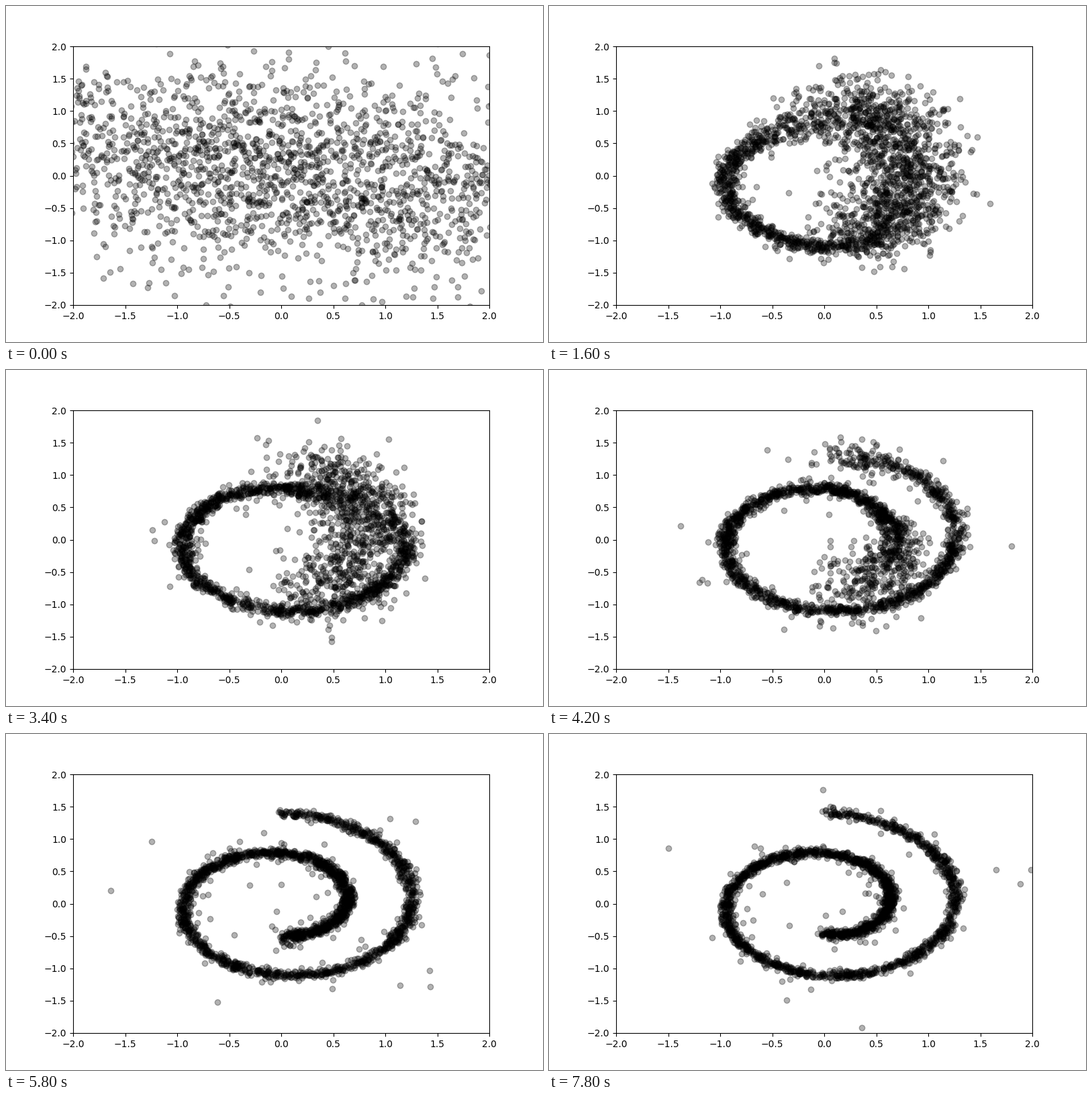
These frames come from a looping animation (800 px wide and 500 px high, 8 s). A matplotlib script:

```python
import numpy as np
import matplotlib.pyplot as plt
from matplotlib.animation import FuncAnimation

PI = np.pi
COUNT = 2200
FRAMES = 40
INTERVAL = 200
CLOUD_END, SHAPE_END = 8, 33     # frames where the cloud and the blur are gone
ANCHOR = 3.2 * PI                # spiral angle that is learned first


def looseness(t, u):
    """1 where the spiral is still blurred, 0 behind the sharp front."""
    front = PI * (0.3 + 1.4 * u * u * (3 - 2 * u))
    return np.clip((np.abs(t - ANCHOR) - front) / (0.6 * PI), 0, 1)


def spiral(rng, frame):
    u = np.clip((frame - CLOUD_END) / (SHAPE_END - CLOUD_END), 0, 1)
    t = rng.uniform(1.5 * PI, 4.5 * PI, COUNT)
    loose = looseness(t, u)

    # Loose coils merge halfway and lean towards the right-hand side.
    side = np.clip((3 * PI - t) / (PI / 2), -1, 1)
    radius = (t + PI * side * loose) / 10
    x, y = radius * np.cos(t), radius * np.sin(t)
    x += 0.45 * loose * (0.55 - x)

    spread = 0.033 + 0.025 * (1 - u) + 0.23 * loose
    spread += 0.1 * (rng.random(COUNT) < 0.04)
    return (x + spread * rng.standard_normal(COUNT),
            y + spread * rng.standard_normal(COUNT))


def samples(frame):
    rng = np.random.default_rng(100 + frame)
    x, y = spiral(rng, frame)

    # Stray points appear once the shape gets sharp.
    stray = rng.random(COUNT) < np.interp(frame, [12, 20], [0, 0.011])
    x = np.where(stray, rng.normal(0.2, 0.8, COUNT), x)
    y = np.where(stray, rng.normal(-0.2, 0.85, COUNT), y)

    # The untrained cloud quickly gives way to the shape.
    cloud_x = rng.normal(0, 1.65, COUNT)
    cloud_y = 0.08 - 0.17 * cloud_x + rng.normal(0, 0.8, COUNT)
    cloud = max(0, 1 - frame / CLOUD_END) ** 3
    return x + cloud * (cloud_x - x), y + cloud * (cloud_y - y)


fig, ax = plt.subplots(figsize=(8, 5), dpi=100)
ax.set_xlim(-2, 2)
ax.set_ylim(-2, 2)
dots, = ax.plot([], [], "o", color="black", alpha=0.3)


def draw(frame):
    dots.set_data(*samples(frame))
    return dots,


anim = FuncAnimation(fig, draw, frames=FRAMES, interval=INTERVAL,
                     repeat=True, repeat_delay=0)
plt.show()
```
